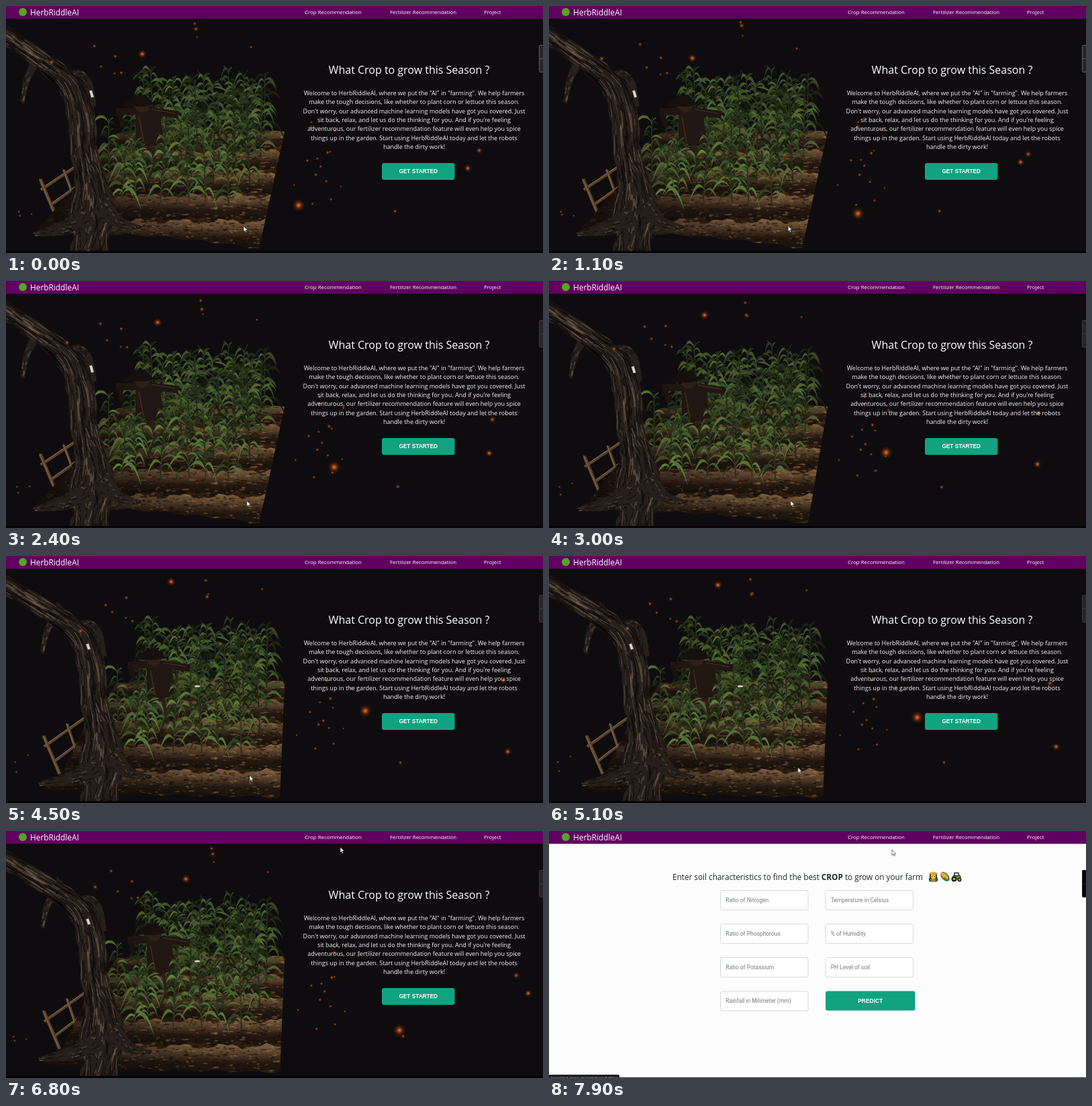
An HTML page with a canvas for the animation above (8000 ms loop, 800x368 px).

```html
<!DOCTYPE html>
<html lang="en">
<head>
<meta charset="utf-8">
<title>Crop helper</title>
<style>
html, body { margin: 0; width: 100%; height: 100%; overflow: hidden; background: #0e0c0f; }
canvas { display: block; }
</style>
</head>
<body>
<canvas id="stage" width="800" height="368"></canvas>
<script>
const c = document.getElementById('stage').getContext('2d');
const LOOP = 8000, FORM_AT = 7800, SWIRL = 6800;
const BRAND = 'HerbRiddleAI', GREEN = '#11a280';
const SANS = '"Open Sans", "Noto Sans", sans-serif';

// Spans in which the picture moves; it stands still in between.
const ACTIVE = [[0, 3100], [4500, 4700], [4900, 4900], [5100, 5100],
  [5800, 6100], [6800, 6900], [7100, 7400], [7800, 7900]];
const POINTER = [[0, 354, 328], [4500, 363, 327], [5800, 380, 301], [6800, 498, 24], [7900, 511, 28]];

const COPY = [
  `Welcome to ${BRAND}, where we put the "AI" in "farming". We help farmers`,
  'make the tough decisions, like whether to plant corn or lettuce this season.',
  "Don't worry, our advanced machine learning models have got you covered. Just",
  "sit back, relax, and let us do the thinking for you. And if you're feeling",
  'adventurous, our fertilizer recommendation feature will even help you spice',
  `things up in the garden. Start using ${BRAND} today and let the robots`,
  'handle the dirty work!'
];
const FIELDS = ['Ratio of Nitrogen', 'Temperature in Celsius', 'Ratio of Phosphorous',
  '% of Humidity', 'Ratio of Potassium', 'PH Level of soil', 'Rainfall in Milimeter (mm)'];

let seed = 1, pose = 0;
const rnd = (a = 0, b = 1) => {
  seed = (seed * 16807) % 2147483647;
  return a + (b - a) * seed / 2147483647;
};
const repeat = (n, make) => Array.from({ length: n }, (_, i) => make(i));
const clamp = v => Math.max(0, Math.min(1, v));
const lerp = (a, b, k) => a + (b - a) * k;
const mix = (a, b) => lerp(a, b, pose);

function shownTime(t) {
  const [, end] = ACTIVE.filter(([start]) => start <= t).pop();
  return Math.min(Math.floor(t / 100) * 100, end);
}

function rect(x, y, w, h, color) {
  c.fillStyle = color;
  c.fillRect(x, y, w, h);
}
function round(x, y, w, h, r, color, edge) {
  c.beginPath();
  c.roundRect(x, y, w, h, r);
  c.fillStyle = color;
  c.fill();
  if (edge) { c.strokeStyle = edge; c.lineWidth = 1; c.stroke(); }
}
function disc(x, y, rx, ry, color) {
  c.fillStyle = color;
  c.beginPath();
  c.ellipse(x, y, rx, ry, 0, 0, 7);
  c.fill();
}
function text(str, x, y, font, color, align = 'left') {
  c.font = font;
  c.fillStyle = color;
  c.textAlign = align;
  c.fillText(str, x, y);
}
function trace(points) {
  c.beginPath();
  points.forEach(([x, y]) => c.lineTo(x, y));
}
function poly(points, color) {
  trace(points);
  c.closePath();
  c.fillStyle = color;
  c.fill();
}
function line(points, width, color) {
  trace(points);
  c.strokeStyle = color;
  c.lineWidth = width;
  c.stroke();
}
function ramp(x0, y0, x1, y1, ...colors) {
  const g = c.createLinearGradient(x0, y0, x1, y1);
  colors.forEach((color, i) => g.addColorStop(i / (colors.length - 1), color));
  return g;
}

// Surface of a bent branch: u runs along it, v from -1 to 1 across it.
function branch(spine) {
  const at = u => {
    const s = clamp(u) * (spine.length - 1), i = Math.min(Math.floor(s), spine.length - 2), k = s - i;
    const [a, b, d, e] = [-1, 0, 1, 2].map(o => spine[Math.max(0, Math.min(spine.length - 1, i + o))]);
    return b.map((p, n) => p + .5 * k * (d[n] - a[n] +
      k * (2 * a[n] - 5 * p + 4 * d[n] - e[n] + k * (3 * (p - d[n]) + e[n] - a[n]))));
  };
  return (u, v) => {
    const [x, y, w] = at(u), [x0, y0] = at(u - .02), [x1, y1] = at(u + .02);
    const len = Math.hypot(x1 - x0, y1 - y0) || 1;
    return [x - (y1 - y0) / len * w * v, y + (x1 - x0) / len * w * v];
  };
}

function bark(spine, strokes) {
  const lean = ([x, y, w]) => [x + 15 * pose * clamp(x / 90), y, w];
  const on = branch(spine.map(lean));
  const side = v => repeat(41, i => on(i / 40, v * (1 + .06 * Math.sin(i * 1.9))));
  c.save();
  poly([...side(-1), ...side(1).reverse()], '#271f1a');
  c.clip();
  for (let i = 0; i < strokes; i++) {
    const u = rnd(-.05, 1), v = rnd(-1, 1), len = rnd(.02, .09), drift = rnd(-.2, .2);
    const lit = rnd() < .5 - Math.abs(v) * .3;
    line(repeat(4, k => on(u + len * k / 3, v + drift * k / 3)), rnd(.7, 2.2),
      lit ? 'rgba(136,114,94,.42)' : 'rgba(8,6,6,.5)');
  }
  c.restore();
}

function tree() {
  const bend = mix(0, 22);
  bark([[60, 74, 9], [45 + bend, 84, 7], [31 + bend, 110, 5], [24 + bend, 145, 3]], 45);
  bark([[84, 112, 5], [106, 100, 5], [122, 114, 6], [126, 150, 9]], 30);
  bark([[-8, 40, 14], [45, 76, 14], [92, 115, 17], [112, 165, 21], [116, 215, 20],
    [126, 262, 24], [129, 305, 35], [126, 345, 27], [122, 378, 30]], 420);
  bark([[128, 312, 15], [88, 330, 11], [42, 340, 3]], 60);
  bark([[140, 296, 16], [168, 322, 9], [202, 330, 2]], 40);
  line([[mix(126, 121), mix(126, 131)], [mix(129, 124), mix(136, 139)]], 4, '#d7d4cf');
}

function ground() {
  const left = mix(44, 55), right = mix(377, 408);
  const bottom = repeat(25, i => {
    const k = 1 - i / 24;
    return [lerp(left, right, k), mix(336 + 25 * k * k, 346 + 13 * Math.sqrt(k)) + Math.sin(i * 1.7) * 2];
  });
  c.save();
  trace([[165, 190], [250, 178], [415, 187], ...bottom, [mix(60, 82), mix(318, 326)], [120, 250]]);
  c.closePath();
  c.clip();
  rect(0, 170, 430, 200, '#32200f');
  for (let k = 0; k < 5; k++) {
    const y = 187 + k * 27 + k * k * 1.6, h = 26 + k * 3;
    const edge = repeat(45, i => [100 + i * 7.2, y + Math.sin(i * .7 + k * 2) * 3 + Math.sin(i * 1.9 + k) * 2]);
    const under = edge.map(([x, ey]) => [x, ey + h]).reverse();
    poly([...edge, ...under], ramp(0, y - 4, 0, y + h, '#806042', '#57402a', '#251910', '#1a120c'));
  }
  for (let i = 0; i < 2600; i++) {
    const x = rnd(50, 415), y = rnd(185, 364), size = rnd(.5, 2.2);
    const litter = x < 330 && y > 235 && y < 310 && rnd() < .25;
    disc(x, y, size * rnd(1, 2.6), size * .6, litter ? 'rgba(84,36,26,.6)'
      : rnd() < .62 ? 'rgba(20,13,9,.5)' : 'rgba(164,126,84,.4)');
  }
  rect(40, 170, 300, 200, ramp(70, 0, 320, 0, 'rgba(8,6,6,.65)', 'rgba(8,6,6,0)'));
  c.restore();
}

function fence() {
  const at = (x, y) => [x + 5 * pose, y + (y > 250 ? 10 : 6) * pose];
  const plank = (x0, y0, x1, y1, width) => {
    line([at(x0, y0), at(x1, y1)], width, '#5a4029');
    line([at(x0 - 1, y0 - 1), at(x1 - 1, y1 - 1)], 1, '#8d6e50');
  };
  plank(52, 274, 158, 203, 4);
  plank(66, 297, 160, 230, 4);
  plank(51, 258, 75, 315, 5);
  plank(86, 244, 101, 285, 4);
}

function leaf(x, y, dx, lift, drop, width, color) {
  const mx = x + dx * .55, my = y - lift;
  c.beginPath();
  c.moveTo(x, y);
  c.quadraticCurveTo(mx, my - width, x + dx, y + drop);
  c.quadraticCurveTo(mx - dx * .1, my + width, x, y + 1);
  c.fillStyle = color;
  c.fill();
}

function corn({ x, y, h, light }) {
  const sway = rnd(-7, 7);
  const px = x + pose * clamp((y - 170) / 190) * 29;
  const green = () => `hsl(${rnd(76, 100)} ${rnd(26, 42)}% ${light * rnd(.3, 1.35)}%)`;
  line([[px, y], [px + sway, y - h]], 2, `hsl(80 28% ${light * .55}%)`);
  for (let i = 0; i < 17; i++) {
    const k = .1 + i * .053, len = rnd(17, 34) * (1.1 - k * .3);
    leaf(px + sway * k, y - h * k, (i % 2 ? 1 : -1) * len * rnd(.5, 1), len * rnd(.3, .9),
      len * rnd(-.3, .95), rnd(2.5, 5), green());
  }
  for (let i = 0; i < 4; i++) {
    leaf(px + sway, y - h * .93, rnd(-12, 12), rnd(7, 12), -rnd(5, 15), 1.8, green());
  }
}

function plants(count, x0, x1, y0, y1, height, light) {
  const row = repeat(count, i => ({
    x: lerp(x0, x1, (i + rnd(-.3, .3)) / (count - 1)), y: rnd(y0, y1), h: height * rnd(.88, 1.1), light
  }));
  row.sort((a, b) => a.y - b.y).forEach(corn);
}

function scarecrow() {
  c.save();
  c.translate(17 * pose, 5 * pose);
  line([[214, 190], [224, 245]], 5, '#2c1e15');
  line([[164, 158], [212, 156], [257, 162]], 11, '#1f1612');
  line([[168, 158], [174, 180]], 7, '#1a1310');
  poly([[193, 156], [230, 156], [234, 203], [214, 208], [193, 201]], '#211712');
  disc(203, 148, 11, 11, '#2d2019');
  poly([[172, 149], [194, 133], [207, 132], [222, 147], [204, 150]], '#15100e');
  line([[198, 165], [205, 202]], 1.2, '#4a3424');
  line([[217, 154], [252, 160]], 1.2, '#4a3424');
  c.restore();
}

function scene(t) {
  pose = clamp((t - 2400) / 2100);
  seed = 4711;
  fence();
  ground();
  plants(13, 208, 388, 186, 202, 88, 22);
  plants(9, 205, 378, 215, 238, 104, 23);
  plants(9, 150, 362, 248, 272, 98, 24);
  scarecrow();
  plants(6, 165, 340, 280, 304, 92, 27);
  if (pose > .3) disc(285, 194, 4, 1.5, '#d8d3c8');
  tree();
}

function glow(x, y, r, strength) {
  const g = c.createRadialGradient(x, y, 0, x, y, r);
  g.addColorStop(0, `rgba(255,150,55,${strength})`);
  g.addColorStop(.25, `rgba(222,96,18,${strength * .75})`);
  g.addColorStop(.55, `rgba(140,54,9,${strength * .4})`);
  g.addColorStop(1, 'rgba(90,30,0,0)');
  disc(x, y, r, r, g);
}

function embers(t) {
  const swing = Math.cos((t - 900) / SWIRL * Math.PI * 2);
  const ember = (x, y, drift, sway, r) =>
    glow(x + drift * t / SWIRL, y + sway * swing, r, r > 5.5 ? .9 : .75);
  ember(436, 270, 150, 40, 10);
  ember(203, 58, 65, 20, 7);
  ember(688, 262, 90, -30, 6);
  ember(705, 203, 55, 18, 5.5);
  ember(68, 95, 65, -17, 4.5);
  ember(283, 45, 25, -16, 4.5);

  seed = 90210;
  const scatter = (count, x0, x1, y0, y1, drift) => {
    while (count--) ember(rnd(x0, x1), rnd(y0, y1), drift, rnd(-9, 9), rnd(2.2, 3.8));
  };
  scatter(8, 20, 390, 28, 120, 25);
  scatter(3, 8, 42, 200, 335, -8);
  scatter(11, 415, 500, 215, 292, 6);
  scatter(3, 450, 500, 170, 200, 35);
  scatter(1, 578, 586, 300, 308, 12);
}

function button(label, x, y, w, h, size) {
  round(x, y, w, h, 3, GREEN);
  text(label, x + w / 2, y + h / 2 + size * .36,
    `bold ${size}px "Liberation Sans", Arial, sans-serif`, '#fff', 'center');
}

function nav() {
  rect(0, 0, 800, 19, '#600060');
  disc(25, 9, 6, 6, '#55a522');
  text(BRAND, 36, 13.6, `11.85px ${SANS}`, '#fff');
  const item = (label, x) => text(label, x, 11.8, `500 7.88px ${SANS}`, '#fff');
  item('Crop Recommendation', 445);
  item('Fertilizer Recommendation', 572);
  item('Project', 712);
}

function sideTab(fill, edge) {
  round(794.5, 58.5, 9, 40, 1, fill, edge);
  line([[794, 78.5], [800, 78.5]], 1, edge);
}

function homePage(t) {
  rect(0, 0, 800, 368, '#0e0c0f');
  scene(t);
  embers(t);
  rect(0, 365, 800, 3, '#030304');
  text('What Crop to grow this Season ?', 600.5, 101.2, `16px ${SANS}`, '#fff', 'center');
  COPY.forEach((row, i) => text(row, 608, 132.6 + i * 13.45, `9px ${SANS}`, '#f4f4f6', 'center'));
  button('GET STARTED', 560, 234, 108.5, 25, 8.25);
  if (t < 2000) sideTab('#26262a', '#5d5d62');
  else sideTab('#24262c', '#393b42');
}

function farmer(x, y) {
  round(x - 6, y + 1, 12, 6, 2, '#2f8f3c', '#111');
  disc(x, y - 1, 5.5, 6.3, '#1b1510');
  disc(x, y - .5, 4, 4.8, '#f5c33b');
  disc(x, y - 4.5, 6.4, 2, '#d49127');
  rect(x - 3, y - 7, 6, 3, '#e8ad3f');
  [-2.4, 1.4].forEach(dx => rect(x + dx, y - 1, 1, 1.5, '#222'));
  rect(x - 3, y + 3, 6, 4, '#c57a2d');
}
function cob(x, y) {
  c.save();
  c.translate(x, y);
  c.rotate(-.75);
  disc(0, 0, 4.8, 8, '#111');
  disc(0, -.5, 3.8, 7, '#f5c22f');
  for (let i = -4; i < 3; i += 2) rect(-3, i, 6, .6, '#cf8e18');
  c.restore();
  poly([[x - 4, y - 1], [x + 1, y + 6], [x + 7, y + 6], [x + 3, y + 3]], '#408e37');
}
function tractor(x, y) {
  line([[x - 3, y], [x - 3, y - 6], [x + 3, y - 6], [x + 4, y]], 1.4, '#222');
  round(x - 5, y - 2, 11, 5, 1, '#4aa34b', '#181818');
  const wheel = (wx, wy, r) => {
    disc(wx, wy, r, r, '#202020');
    disc(wx, wy, r * .45, r * .45, '#e0b538');
  };
  wheel(x - 3.5, y + 3, 4);
  wheel(x + 4.5, y + 4, 3);
}

function formPage() {
  rect(0, 0, 800, 368, '#fdfdfe');
  let x = 184;
  const run = (part, weight) => {
    text(part, x, 72.8, `${weight} 11.75px ${SANS}`, '#212529');
    x += c.measureText(part).width;
  };
  run('Enter soil characteristics to find the best ', 400);
  run('CROP', 700);
  run(' to grow on your farm', 400);
  farmer(572.5, 68);
  cob(590, 68);
  tractor(607, 68.5);
  FIELDS.forEach((label, i) => {
    const fx = i % 2 ? 412 : 255.5, fy = 88.5 + Math.floor(i / 2) * 50.1;
    round(fx, fy, 130.5, 29, 3, '#fff', '#d3d7dc');
    text(label, fx + 7.7, fy + 17.6, '8.48px Roboto, sans-serif', '#777a7e');
  });
  button('PREDICT', 412, 238.5, 133.5, 29, 8.45);
  sideTab('#08080a', '#202024');
  rect(0, 367, 800, 1, '#26262a');
  round(-2, 363, 107, 8, 2, '#222226');
  text('opening crop recommendation', 2, 371, `7px ${SANS}`, '#c4c4c8');
}

function pointer(t) {
  const next = POINTER.findIndex(([when]) => when > t);
  const [a, b] = next < 0 ? POINTER.slice(-1).concat(POINTER.slice(-1)) : POINTER.slice(next - 1, next + 1);
  const k = (t - a[0]) / (b[0] - a[0] || 1);
  c.save();
  c.translate(lerp(a[1], b[1], k), lerp(a[2], b[2], k));
  poly([[0, 0], [0, 8.2], [1.9, 6.5], [3.2, 9.4], [4.5, 8.8], [3.2, 6], [5.8, 5.9]], '#fff');
  c.strokeStyle = '#222';
  c.lineWidth = .6;
  c.stroke();
  c.restore();
}

function frame(now) {
  const t = shownTime(now % LOOP);
  if (t < FORM_AT) homePage(t);
  else formPage();
  nav();
  pointer(t);
  requestAnimationFrame(frame);
}
requestAnimationFrame(frame);
</script>
</body>
</html>
```
